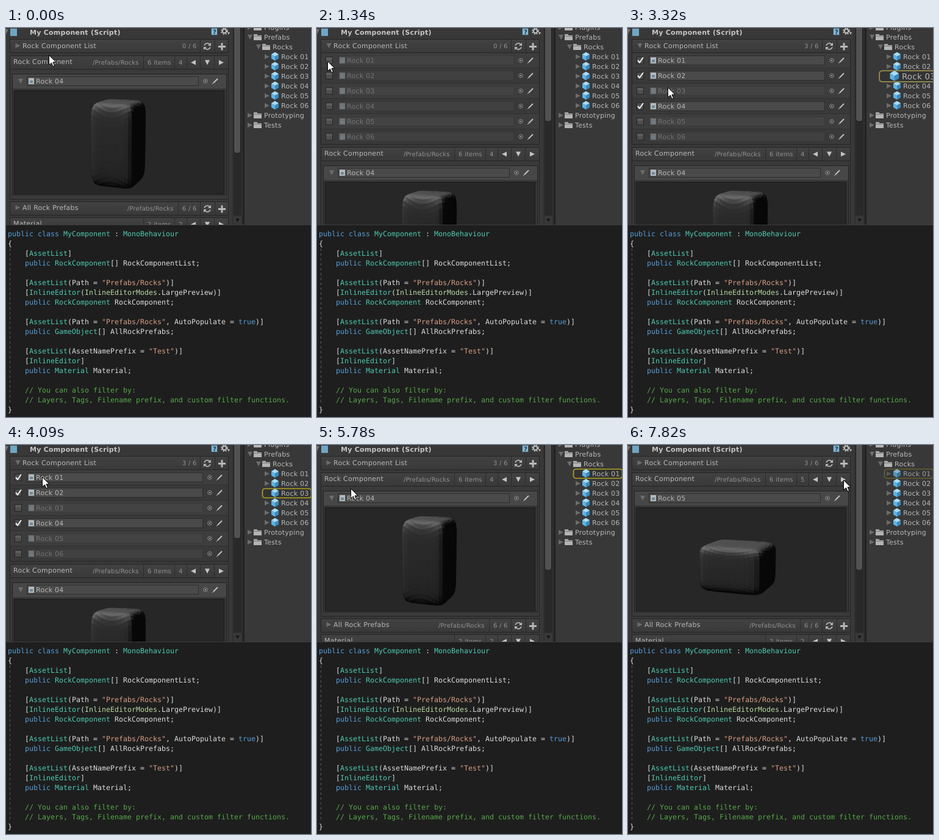
Write an HTML page with a canvas that moves like this. It is 500 px wide and 637 px high and loops after 8000 ms.

```html
<!DOCTYPE html>
<html lang="en">
<head>
<meta charset="utf-8">
<title>Asset list inspector</title>
<style>
html, body { margin: 0; width: 100%; height: 100%; overflow: hidden; background: #1e1e1e; }
canvas { display: block; }
</style>
</head>
<body>
<canvas id="stage" width="500" height="637"></canvas>
<script>
const g = document.getElementById('stage').getContext('2d');
const LOOP = 8000, UI = '"DejaVu Sans", sans-serif', MONO = '"DejaVu Sans Mono", monospace';
const TEXT = '#b8b8b8', DIM = '#929292', EDGE = '#252525', PANEL = '#383838';

const clamp = v => Math.max(0, Math.min(1, v));
const mix = (a, b, p) => a + (b - a) * p;
const ease = (a, b, t) => { const p = clamp((t - a) / (b - a)); return p * p * (3 - 2 * p); };
const range = n => [...Array(n).keys()];
const rowY = i => 53 + 25 * i;
const treeY = i => 15 + 16 * i;

const OPEN = 700, CLOSE = 4733, SWAP = 7700;
const CHECKS = { 0: 1480, 1: 1900, 3: 2560 };
const PINGS = { 2: 3303, 0: 4200 };

// Pointer moves: start, end, x, y
const MOVES = [
  [160, 490, 57, 28], [900, 1340, 17, rowY(0) + 1], [1550, 1760, 18, rowY(1) + 2],
  [2050, 2430, 20, rowY(3) - 2], [2940, 3260, 65, rowY(2) - 6], [3480, 3730, 59, rowY(0) - 1],
  [4230, 4560, 55, 26], [5170, 5780, 55, 71], [5780, 5940, 71, 92], [6000, 6270, 178, 148],
  [6270, 6550, 228, 179], [6600, 6780, 200, 165], [6830, 7500, 353, 57]
];

const CODE = `public class MyComponent : MonoBehaviour
{
    [AssetList]
    public RockComponent[] RockComponentList;

    [AssetList(Path = "Prefabs/Rocks")]
    [InlineEditor(InlineEditorModes.LargePreview)]
    public RockComponent RockComponent;

    [AssetList(Path = "Prefabs/Rocks", AutoPopulate = true)]
    public GameObject[] AllRockPrefabs;

    [AssetList(AssetNamePrefix = "Test")]
    [InlineEditor]
    public Material Material;

    // You can also filter by:
    // Layers, Tags, Filename prefix, and custom filter functions.
}`.split('\n');
const TOKEN = /(\/\/.*)|(".*?")|\b(public|class|true)\b|\b(InlineEditorModes)\b|\b(MyComponent|MonoBehaviour|AssetList|InlineEditor|GameObject|RockComponent(?!;)|Material(?!;))\b|\w+|[^\s\w"]/g;
const INK = ['#57a64a', '#d69d85', '#569cd6', '#b8d7a3', '#4ec9b0'];

function rect(x, y, w, h, fill, edge) {
  g.fillStyle = fill;
  g.fillRect(x, y, w, h);
  if (edge) {
    g.strokeStyle = edge;
    g.lineWidth = 1;
    g.strokeRect(x + .5, y + .5, w - 1, h - 1);
  }
}

function clipped(x, y, w, h, draw) {
  g.save();
  g.beginPath();
  g.rect(x, y, w, h);
  g.clip();
  draw();
  g.restore();
}

function label(s, x, y, color = TEXT, size = 11, weight = '') {
  g.font = `${weight} ${size}px ${UI}`;
  g.letterSpacing = size > 10 ? '0.25px' : '0.2px';
  g.fillStyle = color;
  g.fillText(s, x, y + 4);
}

const small = (s, x, y) => label(s, x, y, DIM, 10);

function trace(pts) {
  g.beginPath();
  for (let i = 0; i < pts.length; i += 2) g.lineTo(pts[i], pts[i + 1]);
}

function poly(pts, fill) {
  trace(pts);
  g.closePath();
  g.fillStyle = fill;
  g.fill();
}

function stroke(color, width, pts) {
  if (pts) trace(pts);
  g.strokeStyle = color;
  g.lineWidth = width;
  g.stroke();
}

function ring(x, y, r, color, width, from = 0, to = 2 * Math.PI) {
  g.beginPath();
  g.arc(x, y, r, from, to);
  stroke(color, width);
}

// turns: 0 right, 1 down, 2 left
function tri(x, y, turns, color = '#6c6c6c', r = 4) {
  g.save();
  g.translate(x, y);
  g.rotate(turns * Math.PI / 2);
  poly([r, 0, -r, -r, -r, r], color);
  g.restore();
}

function bar(y) {
  const fill = g.createLinearGradient(0, y, 0, y + 23);
  fill.addColorStop(0, '#424242');
  fill.addColorStop(1, '#393939');
  rect(6, y, 359, 23, fill, EDGE);
}

const split = (y, ...xs) => xs.forEach(x => rect(x, y + 1, 1, 21, '#2c2c2c'));

function listTools(y) {
  split(y, 318, 342);
  for (const side of [1, -1]) {
    g.save();
    g.translate(330, y + 12);
    g.scale(side, side);
    ring(0, 0, 5, TEXT, 1.6, -2.9, -.5);
    poly([6, -6, 6, -1, 1, -1], TEXT);
    g.restore();
  }
  rect(348, y + 11, 12, 3, TEXT);
  rect(352.5, y + 6.5, 3, 12, TEXT);
}

function pickTools(y, items, index) {
  split(y, 225, 276, 296, 318, 341);
  small(items + ' items', 232, y + 11);
  small(index, 283, y + 11);
  [2, 1, 0].forEach((turns, i) => tri(307 + 23 * i, y + 11.5, turns, '#c4c4c4'));
}

function field(x, y, right, name) {
  rect(x, y - 8, right - x, 16, '#4a4a4a', '#2d2d2d');
  rect(37, y - 5, 9, 10, '#b4babd');
  rect(39, y - 1, 5, 4, '#6b8798');
  label(name, 49, y);
}

function fieldTools(x, y) {
  ring(x, y, 3.3, '#8e8e8e', 1);
  rect(x - 1, y - 1, 2, 2, '#a0a0a0');
  stroke('#c0c0c0', 2, [x + 13, y + 3, x + 20, y - 4]);
  stroke('#c0c0c0', 1, [x + 11, y + 5, x + 13, y + 3]);
}

function listRow(i, checked) {
  const y = rowY(i);
  rect(7, y - 12, 357, 25, i % 2 ? '#393939' : '#3d3d3d');
  rect(7, y + 12, 357, 1, '#303030');
  g.globalAlpha = checked ? 1 : .42;
  field(34, y, 323, 'Rock 0' + (i + 1));
  g.globalAlpha = 1;
  rect(14, y - 6, 12, 12, '#4e4e4e', '#242424');
  if (checked) stroke('#f0f0f0', 2, [16, y, 19, y + 3.5, 25, y - 5]);
  else rect(15, y - 5, 10, 4, '#5c5c5c');
  fieldTools(334, y);
}

// A rounded box, |x|^8 + |y|^8 + |z|^8 = 1, scaled, turned and lit from the upper left
function rock(cx, cy, size, yaw, pitch) {
  const POWER = 8, AROUND = 56, DOWN = 36, light = [-.45, .7, .55];
  const [sy, ky, sp, kp] = [Math.sin(yaw), Math.cos(yaw), Math.sin(pitch), Math.cos(pitch)];
  const turn = ([x, y, z]) => {
    const depth = z * ky + x * sy;
    return [x * ky - z * sy, y * kp - depth * sp, depth * kp + y * sp];
  };
  const surface = (i, j) => {
    const u = 2 * Math.PI * i / AROUND, v = Math.PI * (j / DOWN - .5);
    const d = [Math.cos(v) * Math.sin(u), Math.sin(v), Math.cos(v) * Math.cos(u)];
    const norm = d.reduce((sum, c) => sum + Math.abs(c) ** POWER, 0) ** (1 / POWER);
    return d.map(c => c / norm);
  };
  const project = (i, j) => {
    const [x, y, z] = turn(surface(i, j).map((c, k) => c * size[k])), zoom = 1 + z / 700;
    return [cx + x * zoom, cy - y * zoom];
  };
  for (const i of range(AROUND)) for (const j of range(DOWN)) {
    const s = surface(i + .5, j + .5);
    const n = turn(s.map((c, k) => c ** (POWER - 1) / size[k])), length = Math.hypot(...n);
    if (n[2] < -.05 * length) continue;
    const lit = Math.max(0, n.reduce((sum, c, k) => sum + c * light[k], 0) / length) ** 1.6;
    const tone = Math.round(8 + 100 * lit * (.9 + .15 * s[1]));
    const color = `rgb(${tone},${tone},${tone})`;
    poly([...project(i, j), ...project(i + 1, j), ...project(i + 1, j + 1), ...project(i, j + 1)], color);
    g.closePath();
    stroke(color, .8);
  }
}

function preview(t) {
  const second = t >= SWAP, turn = ease(6280, 6555, t) - ease(6600, 6900, t);
  rect(6, 67, 359, 214, '#3a3a3a', EDGE);
  rect(10, 75, 352, 199, '#363636', '#222');
  rect(11, 76, 350, 23, '#474747');
  tri(24, 87, 1);
  field(34, 87, 316, second ? 'Rock 05' : 'Rock 04');
  fieldTools(327, 87);
  rect(13, 102, 345, 170, '#272727', '#1b1b1b');
  if (second) rock(181, 198, [54, 37, 45], .35, .21);
  else rock(185, mix(188, 180, turn), [37, 68, 37], mix(.35, .6, turn), mix(.21, .54, turn));
}

function inspector(t, pointer) {
  const reveal = ease(OPEN, 950, t) - ease(CLOSE, 4980, t), shift = Math.round(150 * reveal);
  const checked = i => t >= CHECKS[i];
  const hover = pointer[1] > 19 && pointer[1] < 41;

  tri(0, 6, 1, '#777');
  rect(7, 1, 11, 12, '#6fa6c4');
  label('My Component (Script)', 39, 7, '#c6c6c6', 11, 'bold');
  rect(336, 0, 11, 12, '#88b5cf', '#34556a');
  label('?', 339, 6, '#17384c', 10, 'bold');
  g.setLineDash([2, 2]);
  ring(358, 5, 5, '#bdbdbd', 2);
  g.setLineDash([]);
  ring(358, 5, 3.2, '#bdbdbd', 2);
  tri(365, 9, 1, '#bdbdbd', 2);

  bar(18);
  tri(19.5, 29, t >= OPEN && t < CLOSE ? 1 : 0);
  label('Rock Component List', 27, 29, hover ? '#fff' : TEXT);
  small(Object.keys(CHECKS).filter(checked).length + ' / 6', 289, 29);
  listTools(18);

  clipped(6, 41, 359, shift, () => {
    range(6).forEach(i => listRow(i, checked(i)));
    g.strokeStyle = EDGE;
    g.lineWidth = 1;
    g.strokeRect(6.5, 40.5, 358, shift);
  });

  g.save();
  g.translate(0, shift);
  bar(45);
  label('Rock Component', 12, 55);
  small('/Prefabs/Rocks', 142, 56);
  pickTools(45, 6, t >= SWAP ? 5 : 4);
  preview(t);
  bar(284);
  tri(19.5, 294, 0);
  label('All Rock Prefabs', 27, 294);
  small('/Prefabs/Rocks', 199, 295);
  split(284, 282);
  small('6 / 6', 289, 295);
  listTools(284);
  bar(310);
  label('Material', 12, 320);
  pickTools(310, 2, 2);
  g.restore();

  rect(371, 0, 17, 322, '#303030');
  rect(373, 0, 13, 307, '#292929');
  g.beginPath();
  g.roundRect(373.5, -10, 11, 215 - 52 * reveal, 4);
  g.fillStyle = '#525252';
  g.fill();
  stroke('#202020', 1);
  rect(373, 308, 13, 14, PANEL);
  tri(379.5, 315, 1, '#161616', 3);
  rect(388, 0, 3, 322, '#222');
}

function treeItem(name, row, indent, turns) {
  const x = 406 + indent, y = treeY(row);
  tri(x - 6, y, turns);
  rect(x, y - 5, 6, 3, '#a4a4a4');
  rect(x, y - 3, 13, 8, '#b4b4b4');
  rect(x, y - 2, 13, 1, '#777');
  label(name, x + 17, y);
}

// Cube icon: three rhombi of a hexagon
function prefab(i) {
  const y = treeY(i + 2);
  const corner = a => [441 + 7 * Math.cos(a * Math.PI / 3), y - .5 + 7 * Math.sin(a * Math.PI / 3)];
  ['#3a8ac0', '#5fb4e2', '#a9dcf6'].forEach((color, k) => {
    const a = 2 * k - .5;
    poly([441, y - .5, ...corner(a), ...corner(a + 1), ...corner(a + 2)], color);
  });
  label('Rock 0' + (i + 1), 451, y);
}

// Pops up, holds, then fades
function ping(i, age) {
  const zooming = age < 200, y = treeY(i + 2);
  const scale = zooming ? 1 + .75 * Math.sin(Math.PI * age / 200) : 1;
  g.save();
  g.globalAlpha = clamp(1 - (age - 2700) / 1500);
  g.translate(461, y);
  g.scale(scale, scale);
  g.translate(-461, -y);
  g.beginPath();
  g.roundRect(420.5, y - 7.5, 80, 15, 4);
  g.fillStyle = '#333';
  g.fill();
  stroke(zooming ? '#8c8450' : '#aea322', 1.7);
  prefab(i);
  g.restore();
}

function project(t) {
  rect(391, 0, 109, 322, PANEL);
  treeItem('Plugins', -1, 0, 0);
  treeItem('Prefabs', 0, 0, 1);
  treeItem('Rocks', 1, 14, 1);
  treeItem('Prototyping', 8, 0, 0);
  treeItem('Tests', 9, 0, 0);
  for (const i of range(6)) {
    tri(428, treeY(i + 2), 0);
    prefab(i);
  }
  const i = t >= PINGS[0] ? 0 : 2;
  if (t >= PINGS[i]) ping(i, t - PINGS[i]);
}

function code() {
  rect(0, 322, 500, 315, '#1e1e1e');
  rect(0, 322, 500, 1, '#3c3c3c');
  g.setLineDash([4, 4]);
  stroke('#5a5a5a', 1, [6.5, 361, 6.5, 617]);
  g.setLineDash([]);
  g.font = '11.63px ' + MONO;
  g.letterSpacing = '0px';
  CODE.forEach((line, row) => {
    for (const m of line.matchAll(TOKEN)) {
      g.fillStyle = INK[m.slice(1).findIndex(Boolean)] || '#dcdcdc';
      g.fillText(m[0], 3 + 7 * m.index, 341 + 16 * row);
    }
  });
}

function pointerAt(t) {
  let x = 70, y = 44;
  for (const [from, to, nx, ny] of MOVES) {
    const p = ease(from, to, t);
    x = mix(x, nx, p);
    y = mix(y, ny, p);
  }
  return [Math.round(x), Math.round(y)];
}

function drawPointer([x, y]) {
  g.save();
  g.translate(x + .5, y + .5);
  poly([0, 0, 0, 16, 4, 12.5, 6.5, 18.5, 9, 17.5, 6.5, 11.5, 11.5, 11.5], '#fff');
  g.closePath();
  stroke('#000', 1);
  g.restore();
}

const start = performance.now();
function frame() {
  const t = (performance.now() - start) % LOOP, pointer = pointerAt(t);
  g.textRendering = 'geometricPrecision';
  rect(0, 0, 500, 637, PANEL);
  clipped(0, 0, 391, 322, () => inspector(t, pointer));
  clipped(386, 0, 114, 322, () => project(t));
  code();
  drawPointer(pointer);
  requestAnimationFrame(frame);
}
frame();
</script>
</body>
</html>
```
